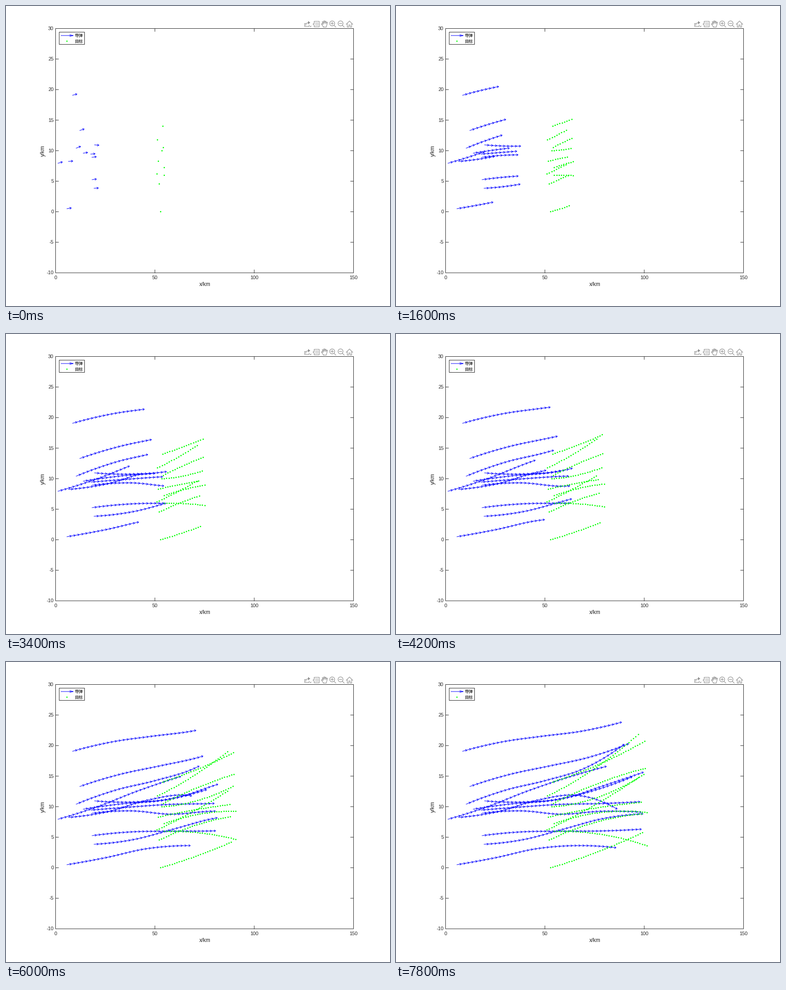
Animation of 848 by 660 pixels, one loop 8 s. Source, as a matplotlib script:

```python
import numpy as np
import matplotlib.pyplot as plt
from matplotlib.animation import FuncAnimation
from matplotlib.collections import LineCollection
from matplotlib.patches import Circle, Polygon, Rectangle

W, H, DPI = 848, 660, 64
PT = 72 / DPI                      # points per pixel
INK, GREY, BLUE, GREEN = "#262626", "#8c8c8c", "#0000ff", "#00ff00"
LEFT, RIGHT, TOP, BOTTOM = 109.5, 767.5, 49.5, 587
SCALE = np.array([(RIGHT - LEFT) / 150, (TOP - BOTTOM) / 40])   # pixels per km
STEPS = 40
MISSILE_SPEED, TARGET_SPEED = 2.0, 1.2      # km per step
ARROW = 1.17                                # arrow length in steps

# Launch x, then the height every ten steps (km).
MISSILES = [
    (8.43, 19.06, 20.60, 21.52, 22.35, 23.80),
    (12.08, 13.29, 15.26, 16.64, 18.06, 20.25),
    (10.26, 10.39, 12.70, 14.26, 16.28, 20.14),
    (19.49, 10.95, 10.76, 11.36, 13.42, 15.60),
    (13.79, 9.58, 10.48, 11.04, 12.55, 14.83),
    (17.55, 9.43, 9.94, 10.37, 10.50, 10.79),
    (18.17, 8.91, 9.31, 8.76, 9.24, 9.10),
    (6.34, 8.24, 9.18, 11.06, 11.86, 9.67),
    (1.09, 7.93, 9.98, 12.51, 14.71, 16.57),
    (18.24, 5.25, 5.87, 5.98, 6.02, 6.30),
    (19.22, 3.84, 4.61, 6.30, 8.03, 8.82),
    (5.58, 0.49, 1.67, 3.10, 3.62, 3.29),
]
# Start x and y (km), climb (m per step), bend (m per step squared).
TARGETS = [
    (53.84, 14.07, 124, 1.21), (51.22, 11.77, 188, 1.79),
    (54.09, 10.57, 197, -1.28), (53.41, 9.99, 29, 2.76),
    (51.63, 8.31, 89, -0.69), (54.71, 7.26, 139.5, -2.39),
    (51.01, 6.22, 183, 0.93), (54.66, 5.98, 11.5, -1.85),
    (52.09, 4.55, 189, -2.02), (52.66, 0.01, 114, 0.87),
]


def to_px(points):
    return np.array([LEFT, BOTTOM]) + (points - np.array([0, -10])) * SCALE


def smooth(t, vals, gap=10):
    """Cubic Hermite curve through evenly spaced values."""
    v = np.asarray(vals)
    m = np.gradient(v, edge_order=2)
    i = np.minimum(t // gap, len(v) - 2)
    s = t / gap - i
    return ((1 + 2 * s) * (1 - s) ** 2 * v[i] + s * (1 - s) ** 2 * m[i]
            + s * s * (3 - 2 * s) * v[i + 1] + s * s * (s - 1) * m[i + 1])


def fly(x0, y, speed):
    """Pixel path of a body that keeps its speed while following heights y."""
    dx = np.sqrt(speed ** 2 - np.diff(y) ** 2)
    x = x0 + np.concatenate([[0], np.cumsum(dx)])
    return to_px(np.column_stack([x, y]))


def arrow(tail, tip, length=3.7, half=2.3):
    """Shaft and open head as two polylines."""
    d = (tip - tail) / np.hypot(*(tip - tail))
    side = half * np.array([-d[1], d[0]])
    base = tip - length * d
    return [np.array([tail, tip]), np.array([base + side, tip, base - side])]


t = np.arange(STEPS + 1)
paths = [fly(x, smooth(t, ys), MISSILE_SPEED) for x, *ys in MISSILES]
arrows = [[part for p in paths
           for part in arrow(p[n], p[n] + ARROW * (p[n + 1] - p[n]))]
          for n in range(STEPS)]
tracks = np.array([fly(x, y + (climb * t + bend * t ** 2) / 1000, TARGET_SPEED)
                   for x, y, climb, bend in TARGETS])

plt.rcParams["path.snap"] = False
fig = plt.figure(figsize=(W / DPI, H / DPI), dpi=DPI, facecolor="white")
ax = fig.add_axes([0, 0, 1, 1])
ax.set(xlim=(0, W), ylim=(H, 0))
ax.axis("off")


def line(xs, ys, color=INK, w=1.0):
    ax.plot(xs, ys, color=color, lw=w * PT)


def label(x, y, s, px=11, font="Liberation Sans", ha="center", **kw):
    ax.text(x, y, s, fontsize=px * PT, family=font, ha=ha, va="center",
            color=kw.pop("color", INK), **kw)


def box(x0, y0, x1, y1, z):
    ax.add_patch(Rectangle((x0, y0), x1 - x0, y1 - y0, fc="white", ec=INK,
                           lw=PT, zorder=z))


def draw_axes():
    box(LEFT, TOP, RIGHT, BOTTOM, 0)
    for v in range(0, 151, 50):
        x = LEFT + v * SCALE[0]
        if 0 < v < 150:
            line([x, x], [BOTTOM, BOTTOM - 6.5])
            line([x, x], [TOP, TOP + 6.5])
        label(x, 598, str(v))
    for v in range(-10, 31, 5):
        y = BOTTOM + (v + 10) * SCALE[1]
        if -10 < v < 30:
            line([LEFT, LEFT + 6.5], [y, y])
            line([RIGHT, RIGHT - 6.5], [y, y])
        label(105.3, y + 0.5, str(v), ha="right")
    label(439.3, 612.5, "x/km", 11.7)
    label(82, 318.5, "y/km", 11.7, rotation=90)


def draw_legend():
    box(117.5, 57.5, 173.5, 84.5, 5)
    key = arrow(np.array([121, 65.0]), np.array([148.5, 65.0]), 8, 1.8)
    ax.add_collection(LineCollection(key, colors=BLUE, linewidths=PT, zorder=6))
    ax.add_patch(Circle((134.6, 77.4), 1.4, fc=GREEN, ec="none", zorder=6))
    for y, s in ((65, "导弹"), (78, "目标")):
        label(151.5, y, s, 9.2, "Noto Sans CJK JP", "left", zorder=6,
              color="black")


def stroke(*pts):
    line(*zip(*pts), color=GREY, w=1.1)


def draw_toolbar():
    # export
    stroke((662, 38.5), (659.5, 38.5), (659.5, 45), (669.5, 45), (669.5, 42))
    stroke((661.8, 42.5), (662.6, 39.5), (664.5, 37.5), (668, 36.8))
    for tri in ([(667, 33), (667, 40.2), (671.8, 36.6)],
                [(673.8, 42.8), (673.8, 46), (670.8, 46)]):
        ax.add_patch(Polygon(tri, fc=GREY, ec="none"))
    # data tip
    stroke((680.5, 38), (680.5, 33.7), (691.7, 33.7), (691.7, 45.7),
           (680.5, 45.7), (680.5, 41.8), (678, 39.9), (680.5, 38))
    for y in (37.7, 41.7):
        stroke((683, y), (689.5, y))
    # hand
    stroke((701.2, 46.3), (696.5, 39.8), (697.3, 38.6), (700.3, 40.6),
           (698.3, 35), (699.8, 34.3), (701.7, 38.6), (701.6, 33),
           (703.4, 32.6), (704.2, 38.2), (705.2, 33.3), (706.8, 33.6),
           (706.7, 38.7), (708.6, 35.4), (710, 36), (707.3, 46.3),
           (701.2, 46.3))
    # zoom in and out
    for x in (720.3, 738.8):
        ax.add_patch(Circle((x, 38.3), 5.5, fill=False, ec=GREY, lw=1.1 * PT))
        stroke((x + 4, 42.3), (x + 8, 46.3))
        stroke((x - 3, 38.3), (x + 3, 38.3))
    stroke((720.3, 35.3), (720.3, 41.3))
    # home
    stroke((751.3, 40.3), (758.5, 33), (765.7, 40.3))
    stroke((753.6, 39), (753.6, 46.3), (757, 46.3), (757, 41.8),
           (760, 41.8), (760, 46.3), (763.4, 46.3), (763.4, 39))


draw_axes()
draw_legend()
draw_toolbar()
missiles = LineCollection([], colors=BLUE, linewidths=PT, zorder=3)
ax.add_collection(missiles, autolim=False)
dots, = ax.plot([], [], ls="none", marker="o", ms=2.9 * PT, mfc=GREEN,
                mec="none", zorder=4)


def update(n):
    missiles.set_segments([s for group in arrows[:n + 1] for s in group])
    dots.set_data(*tracks[:, :n + 1].reshape(-1, 2).T)
    return missiles, dots


anim = FuncAnimation(fig, update, frames=STEPS, interval=200, repeat=True,
                     repeat_delay=0, blit=False)
plt.show()
```
